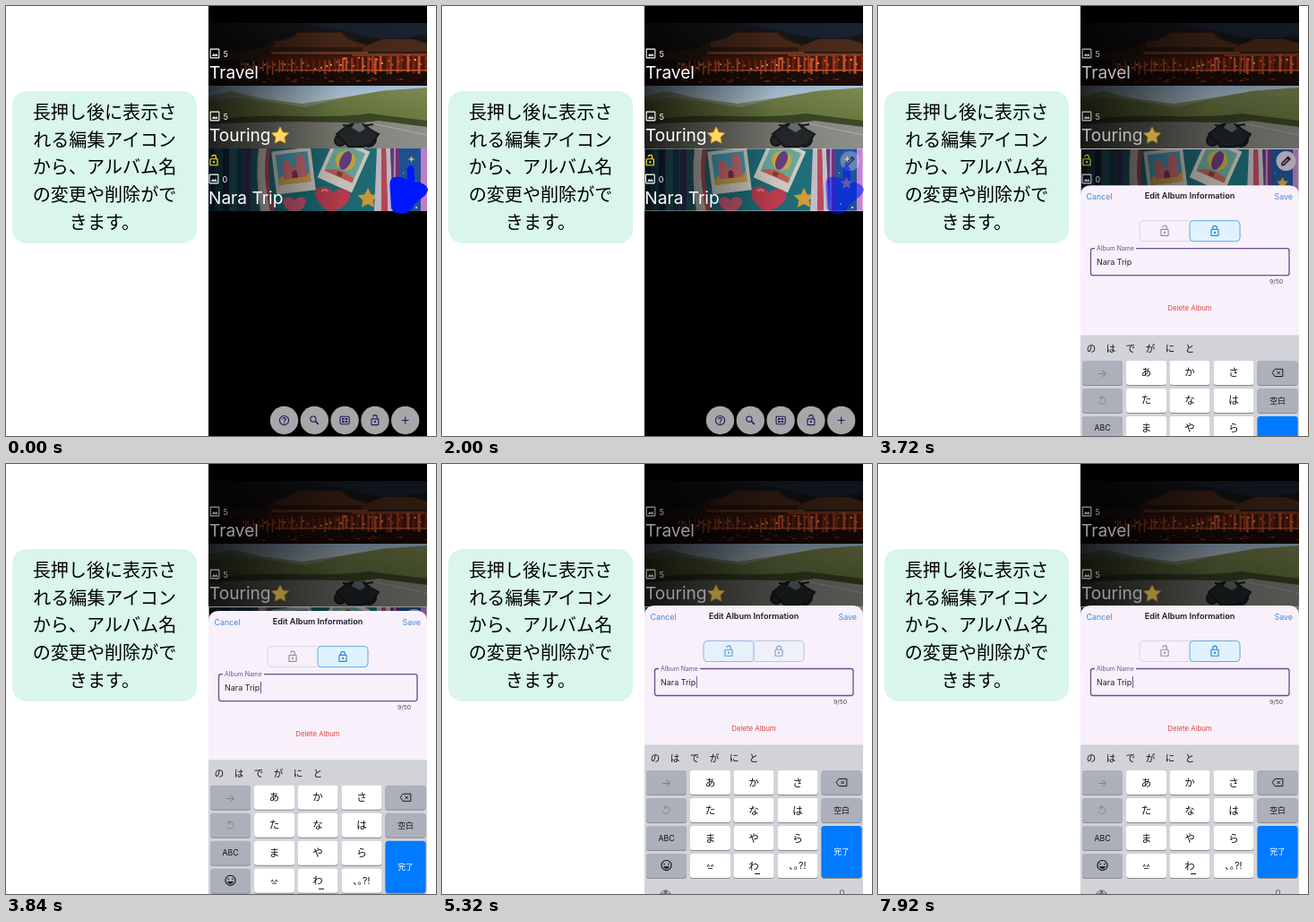
These frames come from a looping animation (480 by 480 pixels, 8 s). An HTML page:

```html
<!DOCTYPE html>
<html lang="ja">
<head>
<meta charset="utf-8">
<style>
html, body { margin: 0; height: 100%; overflow: hidden; background: #fff; }
svg { display: block; width: 480px; height: 480px; font-family: Inter, "Noto Sans CJK JP", "Noto Sans CJK", sans-serif; }
.line { fill: none; stroke: currentColor; stroke-width: 2; }
.mid { text-anchor: middle; }
</style>
</head>
<body>
<svg viewBox="0 0 480 480">
  <defs>
    <clipPath id="phone"><path d="M226 0h244v480H226z"/></clipPath>
    <clipPath id="row"><path d="M226 0h244v70H226z"/></clipPath>
    <linearGradient id="shade">
      <stop offset="0" stop-opacity=".76"/><stop offset=".25" stop-opacity=".5"/><stop offset=".6" stop-opacity=".12"/><stop offset="1" stop-opacity="0"/>
    </linearGradient>
    <linearGradient id="sky" x2="0" y2="1"><stop stop-color="#a9c6df"/><stop offset=".4" stop-color="#d8dfe0"/></linearGradient>
    <linearGradient id="hill" x2="0" y2="1"><stop stop-color="#7d8a54"/><stop offset=".6" stop-color="#6a7a3c"/><stop offset="1" stop-color="#47562b"/></linearGradient>
    <linearGradient id="night" x2="0" y2="1"><stop stop-color="#171b22"/><stop offset=".5" stop-color="#16120f"/><stop offset="1" stop-color="#1d0b07"/></linearGradient>
    <g id="photo" class="line"><rect x="3" y="3" width="18" height="18" rx="1"/><path d="M6 17l4-5 3 3 2-3 4 5z" fill="currentColor" stroke="none"/></g>
    <g id="lock" class="line"><rect x="5" y="9" width="14" height="12" rx="1"/><path d="M8 9V6a4 4 0 0 1 8 0v3"/><circle cx="12" cy="15" r="1"/></g>
    <g id="unlock" class="line"><rect x="5" y="9" width="14" height="12" rx="1"/><path d="M16 9V6a4 4 0 0 0-8-1"/><circle cx="12" cy="15" r="1"/></g>
    <g id="help" class="line"><circle cx="12" cy="12" r="9"/><path d="M9 10a3 3 0 1 1 4.500 2.500q-1.500 1-1.500 2.500M12 16.500v2"/></g>
    <g id="find" class="line"><circle cx="9.500" cy="9.500" r="5.500"/><path d="M14 14l6 6" stroke-width="3"/></g>
    <g id="grid" class="line"><rect x="3" y="4.500" width="18" height="15" rx="2"/><path d="M6.500 9.500h4.500M13 9.500h4.500M6.500 14.500h4.500M13 14.500h4.500" stroke-width="3.500"/></g>
    <g id="plus" class="line"><path d="M12 5v14M5 12h14"/></g>
    <g id="pen" class="line"><path d="M4 20v-4L16 4l4 4L8 20zM14 6l4 4" fill="currentColor" fill-opacity=".4"/></g>
    <g id="back" class="line"><path d="M7 5h15v14H7L2 12zM11 9l6 6M17 9l-6 6" stroke-width="1.600"/></g>
    <g id="undo" class="line"><path d="M7 8a7 7 0 1 1-2 7M11 3L7 8l5 3" stroke-width="1.600"/></g>
    <g id="smile" class="line"><circle cx="12" cy="12" r="9.500"/><path d="M8 8v3M16 8v3"/><path d="M6 14h12q-2 5-6 5t-6-5z" fill="currentColor" stroke="none"/></g>
    <path id="heart" d="M0 14C-22-2-16-15-7-14Q-2-13 0-8Q2-13 7-14C16-15 22-2 0 14z"/>
  </defs>

  <rect x="7" y="95" width="206" height="170" rx="16" fill="#d9f5ed"/>
  <g id="note" class="mid" font-size="20.100" font-weight="500" fill="#000"></g>

  <g clip-path="url(#phone)">
    <path d="M226 0h244v480H226z"/>

    <g transform="translate(0 19)" clip-path="url(#row)">
      <path d="M226 0h244v70H226z" fill="url(#night)"/>
      <path d="M330 0q40 6 70 14t70-2V0z" fill="#1b2230"/>
      <path d="M226 36l60-8 12-8q20-2 28-10h50q10 11 30 14l64 6v12H226z" fill="#2c1c13"/>
      <path d="M300 21q18-2 26-10h48q8 10 26 13v3H300zM398 27l22-9h34l16 5v9h-72z" fill="#4c2b1a"/>
      <path d="M296 32h108v3H296zM386 34h84v3h-84z" fill="#7d3a1e"/>
      <g id="lamps"></g>
      <path d="M226 0h244v70H226z" fill="url(#shade)"/>
    </g>

    <g transform="translate(0 89)" clip-path="url(#row)">
      <path d="M226 0h244v70H226z" fill="url(#sky)"/>
      <path d="M226 12l25-6 34 8 45 6 40-6 55-9 45-2v50H226z" fill="#8b9a80"/>
      <path d="M226 18l28-5 40 5 40 6 36-9 48-9 52-4v62H226z" fill="url(#hill)"/>
      <path d="M226 40q40-8 100-6 50 1 80-3l64 8v8H226z" fill="#3d4a29"/>
      <path d="M226 43q70-4 150-2l94 6v23H226z" fill="#84837a"/>
      <path d="M376 44l40-5 54 7v24H380z" fill="#8f8f8a"/>
      <path d="M403 41l67 14" stroke="#b5b09a" fill="none"/>
      <g stroke="#17191b" stroke-width="2" fill="#252a2d">
        <circle cx="373" cy="61" r="6"/><circle cx="405" cy="60" r="8"/>
        <path d="M369 54l10-8 6-3h14l8 6 9 5-8 11-9 3H382z"/>
        <path d="M386 45l-10-1M398 45l12-2" fill="none"/>
      </g>
      <path d="M386 47l3-5h8l4 6-6 4z" fill="#69757d"/>
      <path d="M226 0h244v70H226z" fill="url(#shade)"/>
    </g>

    <g transform="translate(0 159)" clip-path="url(#row)">
      <path d="M226 0h244v70H226z" fill="#24808c"/>
      <g id="spines"></g>
      <path d="M282 0h9q-5 30 4 70h-11q-6-40-2-70z" fill="#f0e4dc"/>
      <path d="M291 0h4q-5 34 5 70h-5q-8-36-4-70z" fill="#e05565"/>
      <g transform="translate(321 25) rotate(-7)">
        <path d="M-22-24h44v48h-44z" fill="#f4eee5"/><path d="M-18-20h36v34h-36z" fill="#55b5d3"/>
        <path d="M-18 8q8-9 18-3t18-2v11h-36z" fill="#f4bd54"/>
        <path d="M-12 8v-16l5-6 5 6v4h6v-9l5-6 5 6v21z" fill="#ef7e88"/><path d="M-2 8v-6q3-5 6 0v6z" fill="#8d3e62"/>
      </g>
      <g transform="translate(377 18) rotate(24)">
        <path d="M-21-25h42v50h-42z" fill="#f6eee4"/><path d="M-17-21h34v36h-34z" fill="#7cc5b6"/>
        <circle cy="-5" r="11" fill="#f2c44c"/><ellipse cy="-5" rx="6" ry="11" fill="#764899"/>
        <path d="M-17 15q12-12 34-5v5z" fill="#e56e63"/><path d="M-3 9h6v5h-6z" fill="#8b5130"/>
      </g>
      <use href="#heart" transform="translate(364 58) rotate(7) scale(1.300 1)" fill="#e0485d"/>
      <path d="M352 48q4-4 7 0" stroke="#f79a9c" stroke-width="2" fill="none"/>
      <use href="#heart" transform="translate(322 64) scale(.85 .7)" fill="#e66582"/>
      <path class="star" data-at="404 56 12" fill="#f3b63e"/>
      <path d="M414 0h5v70h-8zM424 0h5l3 70h-6z" fill="#ded7e4"/>
      <path d="M419 0h5l2 70h-7z" fill="#d75266"/><path d="M429 0h10v70h-7z" fill="#7a3b86"/>
      <path d="M433 0h2v70h-3z" fill="#b99bd0"/>
      <path d="M439 0h24v70h-24z" fill="#245ca6"/><path d="M463 0h7v70h-7z" fill="#d58ddf"/>
      <path class="star" data-at="451.500 39 7" fill="#f4bd42"/>
      <path d="M452.500 8l1 3 3 1-3 1-1 3-1-3-3-1 3-1z" fill="#f2d36a"/>
      <path d="M444 61h2v2h-2zM457 65h2v2h-2zM443 27h1v1h-1z" fill="#cfe0f4"/>
      <path d="M226 0h244v70H226z" fill="url(#shade)"/>
      <path id="rowDim" d="M226 0h244v70H226z"/>
    </g>

    <g id="titles" fill="#fff" color="#fff"></g>
    <path class="star" data-at="306 145 10" fill="#ffd95c" stroke="#f0a52f" stroke-width=".7"/>

    <g id="picked">
      <path d="M226.500 159.500h243v69h-243z" fill="none" stroke="#fff"/>
      <circle cx="455.500" cy="173" r="11" fill="#eadff8"/>
      <use href="#pen" transform="translate(448.500 166) scale(.58)" color="#1d1a22"/>
    </g>
    <g id="tools" color="#211b55"></g>
    <path id="veil" d="M226 0h244v480H226z"/>

    <g id="sheet">
      <path d="M226 500V170q0-12 12-12h220q12 0 12 12v330z" fill="#f8f0fa"/>
      <g font-size="8.900" fill="#4389dc"><text x="232.500" y="174">Cancel</text><text x="463" y="174" text-anchor="end">Save</text></g>
      <text class="mid" x="348" y="173" font-size="9.100" font-weight="600" fill="#1d1b20">Edit Album Information</text>
      <rect x="292" y="197.500" width="112" height="23" rx="5" fill="none" stroke="#dcd4df"/>
      <g id="left"></g><g id="right"></g>
      <rect x="237.500" y="228.500" width="221.500" height="30" rx="2.500" fill="none" stroke="#61528f" stroke-width="1.300"/>
      <path d="M242 226h46v5h-46z" fill="#f8f0fa"/>
      <text x="244" y="231.300" font-size="6.900" fill="#665895">Album Name</text>
      <text x="244" y="247" font-size="9" fill="#252229">Nara Trip</text>
      <path id="caret" d="M284.500 237v13" stroke="#6555a0"/>
      <text x="452" y="268" font-size="6.800" text-anchor="end" fill="#4a4650">9/50</text>
      <text class="mid" x="348" y="297.500" font-size="7.800" fill="#da4a40">Delete Album</text>
    </g>

    <g id="keyboard">
      <path d="M226 313.500h244V490H226z" fill="#d1d3d9"/>
      <g id="keys" class="mid" fill="#111" color="#111"></g>
      <g class="line" color="#5a5d63" style="stroke-width:1"><circle cx="249.500" cy="482" r="6"/><path d="M249.500 476v8M244 480h11M247 484q0-5 2.500-8 2.500 3 2.500 8"/><rect x="444.500" y="475.500" width="4" height="8" rx="2"/></g>
    </g>
  </g>

  <path id="hand" fill="#0018ff" d="M447.500 182Q448 178 451.500 178T455.500 182L456.500 196Q470 198 471 205Q470 211 462 216L455 222Q452 231 443 232Q433 232 430 226L428.500 201Q428 191 434 191Q440 190 448 194z"/>
</svg>
<script>
const $ = id => document.getElementById(id);
const clamp = v => Math.max(0, Math.min(1, v));
const ramp = (t, from, to) => clamp((t - from) / (to - from));
const icon = (id, x, y, size, more = '') =>
  `<use href="#${id}" transform="translate(${x - size / 2} ${y - size / 2}) scale(${size / 24})" ${more}/>`;
const text = (s, x, y, size, more = '') => `<text x="${x}" y="${y}" font-size="${size}" ${more}>${s}</text>`;
const rect = (x, y, w, h, fill, more = '') => `<rect x="${x}" y="${y}" width="${w}" height="${h}" fill="${fill}" ${more}/>`;

$('note').innerHTML = ['長押し後に表示さ', 'れる編集アイコン', 'から、アルバム名', 'の変更や削除がで', 'きます。']
  .map((s, i) => text(s, 110, 126 + i * 30.7, 20.1)).join('');

for (const star of document.querySelectorAll('.star')) {
  const [x, y, r] = star.dataset.at.split(' ').map(Number);
  const points = Array.from({ length: 10 }, (_, i) => {
    const a = i * Math.PI / 5, d = i % 2 ? r * .5 : r;
    return [x + d * Math.sin(a), y - d * Math.cos(a)];
  });
  star.setAttribute('d', 'M' + points.join('L') + 'z');
}

// Lit pillars, lanterns and their reflections in the night scene
let seed = 5;
const random = () => (seed = seed * 16807 % 2147483647) / 2147483647;
const pick = list => list[Math.floor(random() * list.length)];
let lamps = rect(290, 37, 180, 16, '#4a1a0e');
for (let x = 262; x < 470; x += 3 + random() * 5) {
  const near = (x - 262) / 208, top = 42 - near * 8 + random() * 3;
  lamps += rect(x, top, 1.5 + near * 1.5, 10 + near * 8 + random() * 4, pick(['#a83a1c', '#d0502a', '#7a2614'])) +
    rect(x + 2, top + random() * 9, 2, 2, pick(['#f7b765', '#e27b38', '#c85a2a'])) +
    rect(x, 60 + random() * 6, 3 + random() * 4, 1.5, pick(['#8a2f18', '#4e1a0f', '#2a0e09']));
}
$('lamps').innerHTML = lamps + rect(300, 52, 170, 1.5, '#c25a30');

$('spines').innerHTML = ['#1d4a75', '#2f7486', '#23396b', '#3b8a90', '#205f78', '#4b3f78', '#2a7484']
  .map((c, i) => rect(226 + i * 8, 0, 7, 70, c)).join('');

$('titles').innerHTML = [['Travel', 5], ['Touring', 5], ['Nara Trip', 0]].map(([name, count], i) => {
  const y = 53 + i * 70;
  return `<g${i == 2 ? ' id="third"' : ''}>` + icon('photo', 233, y, 13) + text(count, 242.5, y + 3.5, 9) +
    text(name, 227, y + 28, 19.1) + (i == 2 ? icon('unlock', 233, 172.5, 14, 'color="#ffdc3e"') : '') + '</g>';
}).join('');

$('tools').innerHTML = ['help', 'find', 'grid', 'unlock', 'plus'].map((id, i) => {
  const x = 310.5 + i * 33.8;
  return `<circle cx="${x}" cy="462.500" r="15.700" fill="#a9a6aa"/>` + icon(id, x, 462.5, 13.5);
}).join('');

const half = (x, id) => `<g class="off">${icon(id, x + 28, 209, 14, 'color="#96909a"')}</g><g class="on">` +
  rect(x, 197.5, 56, 23, '#e0f2fd', 'rx="4" stroke="#62aee4"') + icon(id, x + 28, 209, 14, 'color="#2688d8"') + '</g>';
$('left').innerHTML = half(292, 'unlock');
$('right').innerHTML = half(348, 'lock');

const cols = [228, 277, 325.5, 374.5, 423.5];
const key = (c, r, fill, h = 27) => {
  const x = cols[c], y = 342 + r * 31;
  return rect(x, y + 1, 45, h, '#898b91', 'rx="3"') + rect(x, y, 45, h, fill, 'rx="3"');
};
let keys = [...'のはでがにと'].map((s, i) => text(s, 238 + i * 22, 332, 10.5)).join('');
['あかさ', 'たなは', 'まやら', ' わ '].forEach((row, r) => {
  keys += key(0, r, '#abb0ba');
  [...row].forEach((s, i) => keys += key(i + 1, r, '#fff') + text(s, cols[i + 1] + 22.5, 359.5 + r * 31, 11.5));
});
keys += key(4, 0, '#abb0ba') + key(4, 1, '#abb0ba') + key(4, 2, '#007aff', 58) +
  text('→', 250.5, 360, 12, 'fill="#7b8089"') + icon('undo', 250.5, 386, 13, 'color="#7b8089"') +
  text('ABC', 250.5, 420.5, 8.7) + icon('smile', 250.5, 448, 14) +
  icon('back', 446, 355.5, 14) + text('空白', 446, 390, 8.8) + text('完了', 446, 436, 8.8, 'fill="#fff"') +
  text('^^', 299.5, 453, 9) + rect(297, 451, 5, .8, '#111') + rect(349, 457, 6, 1, '#111') +
  text('､｡?!', 397, 452, 10.5);
$('keys').innerHTML = keys;

const fade = (el, v) => el.setAttribute('opacity', v);
const shift = (id, x, y) => $(id).setAttribute('transform', `translate(${x} ${y})`);
const spring = (t, speed) => t < 0 ? 1 : (1 + speed * t) * Math.exp(-speed * t);
const setHalf = (id, v) => {
  fade($(id).querySelector('.on'), v);
  fade($(id).querySelector('.off'), 1 - v);
};

function draw() {
  const t = performance.now() % 8000;

  // Elastic press, then the finger lifts
  const p = ramp(t, 500, 1460);
  const scale = 1 + .35 * Math.exp(-1.8 * p) * Math.sin(p * 2 * Math.PI);
  $('hand').setAttribute('transform', `translate(449.500 205) scale(${scale}) translate(-449.500 -205)`);
  fade($('hand'), 1 - ramp(t, 1840, 2200));

  const picked = ramp(t, 1880, 2240);
  fade($('picked'), picked);
  fade($('rowDim'), .1 * (1 - picked));
  shift('third', picked - 1, 0);

  const rise = (t - 3540) / 1000;
  shift('sheet', 0, 322 * spring(rise, 19.6));
  shift('keyboard', 0, 167 * spring(rise, 12.9));
  fade($('veil'), .4 * ramp(t, 3560, 3800));

  const blink = (t + 200) % 1000;
  fade($('caret'), ramp(blink, 0, 40) * (1 - ramp(blink, 500, 700)));

  const unlocked = ramp(t, 5240, 5360) - ramp(t, 7080, 7200);
  setHalf('left', unlocked);
  setHalf('right', 1 - unlocked);
  requestAnimationFrame(draw);
}
draw();
</script>
</body>
</html>
```
